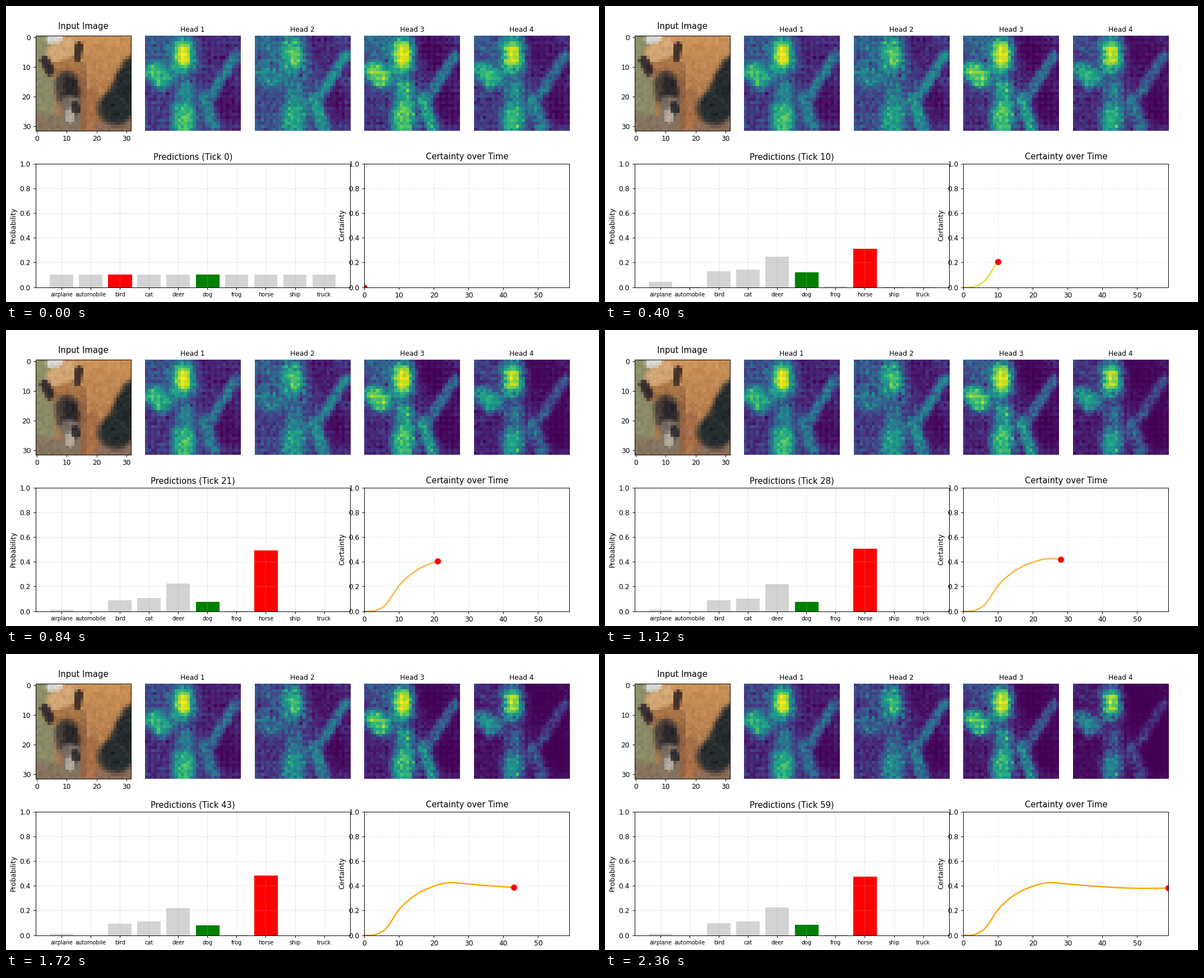
Write a matplotlib script that moves like this. It is 1058 px wide and 529 px high and loops after 2400 ms.

```python
import numpy as np
import matplotlib.pyplot as plt
from matplotlib.animation import FuncAnimation
from matplotlib.colors import to_rgb

plt.rcParams["font.family"] = "DejaVu Sans"
TICKS, N = 60, 32
CLASSES = ["airplane", "automobile", "bird", "cat", "deer",
           "dog", "frog", "horse", "ship", "truck"]
BIRD, DEER, DOG = (CLASSES.index(c) for c in ("bird", "deer", "dog"))

rng = np.random.default_rng(7)
row, col = np.mgrid[0:N, 0:N]


def paint(img, strokes, sharp):
    """Blend (value, x0, y0, x1, y1, width) strokes over img, in order."""
    for value, x0, y0, x1, y1, w in strokes:
        dx, dy = x1 - x0, y1 - y0
        u = np.clip(((col - x0) * dx + (row - y0) * dy) / (dx * dx + dy * dy), 0, 1)
        d = np.hypot(col - x0 - u * dx, row - y0 - u * dy)
        mask = np.exp(-(d / (w + .4)) ** sharp)[..., None]
        img = img + (np.asarray(value) - img) * mask
    return img


# ---- input picture: soft flat shapes -------------------------------------
SHAPES = [
    ("#8e8f67", 1, 0, 0, 12, 4.5), ("#8b8a66", 2, 16, 2, 24, 4.5),
    ("#857560", 1, 29, 13, 30.5, 3), ("#a87048", 18, 19, 18, 32, 2),
    ("#966442", 15.3, 10, 15.3, 30, .8), ("#d7d7d4", 5, .8, 7, .5, 1.6),
    ("#aa7648", 6, 10, 12, 11, 3.5), ("#d4a876", 6, 5.5, 11, 3.5, 2.8),
    ("#3a2d30", 2.5, 8, 4.3, 11.5, 1.3), ("#423028", 14, 3, 13.5, 7, 1),
    ("#423a37", 10, 15.5, 10.5, 19.5, 3.8), ("#2a2628", 11, 16, 11.5, 18, 2),
    ("#7a7066", 11, 23, 11.5, 26, 2.9), ("#b4aa9e", 11, 25.5, 11, 27.5, 1.1),
    ("#323030", 12.8, 23, 13, 24.5, 1.1), ("#8c6c58", 22, 31, 32, 29.5, 2.5),
    ("#262d2f", 32.5, 11, 27, 22, 4.4), ("#262d2f", 25.3, 24, 26.2, 24.5, 5),
    ("#262d2f", 30, 14, 29, 24, 3),
]


def make_photo():
    fade = (row / (N - 1))[..., None]
    base = (1 - fade) * to_rgb("#cb9258") + fade * to_rgb("#a87248")
    img = paint(base, [(to_rgb(c), *s) for c, *s in SHAPES], 7)
    return np.clip(img + rng.normal(0, .018, (N, N, 1)), 0, 1)


# ---- attention maps: one skeleton, other levels per head -----------------
PARTS = [
    (0, 1, 8, 5, 5), (20, 3, 27, 9, 7), (26, 20, 28, 25, 5),          # backdrop
    (6, 13, 11, 11, 3), (13, 17, 13, 24, 2.8),                        # links
    (29.7, 6.5, 21.5, 19.5, 1.5), (19, 21, 22.2, 30, 1.8),            # bands
    (2.5, 11.5, 5, 14, 3), (12.5, 26, 12.6, 29.5, 3.6),               # blobs
    (12.4, 3.5, 12.5, 8.5, 3.7), (12.3, 4.8, 12.5, 7.5, 2),
]
# base level, contrast growth, level of each part
HEADS = [
    (.18, .25, [.30, .12, .05, .40, .45, .42, .45, .68, .70, .66, .97]),
    (.24, .45, [.36, .11, .06, .36, .44, .48, .52, .46, .62, .58, .75]),
    (.16, .45, [.34, .03, .03, .45, .64, .38, .56, .80, .75, .74, .95]),
    (.16, .95, [.27, .05, .03, .40, .47, .36, .42, .67, .66, .68, .92]),
]


def make_map(base, levels):
    strokes = [(v, *p) for v, p in zip(levels, PARTS)]
    z = paint(np.full((N, N, 1), base), strokes, 3)[..., 0]
    weave = .016 * ((-1.0) ** row + (-1.0) ** col)
    grain = rng.normal(0, 1, (N, N)) * (.01 + .24 * z * (1 - z))
    return np.clip(z + weave + grain, .004, 1)


MAPS = [make_map(base, levels) for base, _, levels in HEADS]


def attention(i, t):
    return MAPS[i] ** (1 + HEADS[i][1] * t / (TICKS - 1))


# ---- certainty and predictions -------------------------------------------
KEYS = np.array([(0, 0), (3, .004), (6, .048), (10, .208), (14, .311), (20, .396),
                 (25, .426), (28, .419), (36, .4), (51, .379), (59, .381)])


def hermite(t, ts, ys):
    m = np.gradient(ys, ts)
    i = np.clip(np.searchsorted(ts, t, side="right") - 1, 0, len(ts) - 2)
    h = ts[i + 1] - ts[i]
    u = (t - ts[i]) / h
    return ((1 + 2 * u) * (1 - u) ** 2 * ys[i] + u * (1 - u) ** 2 * h * m[i]
            + u * u * (3 - 2 * u) * ys[i + 1] + u * u * (u - 1) * h * m[i + 1])


certainty = np.clip(hermite(np.arange(TICKS), *KEYS.T), 0, 1)
LOGITS = np.array([-3.6, -12.3, -1.6, -1.45, -.76, -1.76, -7.2, 0, -11, -8.6])


def predict(t):
    """Softmax that sharpens with certainty; bird leads first, deer fades late."""
    z = LOGITS * certainty[t] / certainty[-1]
    z[BIRD] += .02 * np.exp(-t)
    z[DEER] += .25 * np.exp(-((t - 13) / 5) ** 2)
    p = np.exp(z)
    return p / p.sum()


def line_color(t):
    return "#dcdc32" if t < 20 else "#ffb43c" if t < 32 else "orange"


# ---- layout --------------------------------------------------------------
fig = plt.figure(figsize=(12, 6), dpi=529 / 6, facecolor="white")
grid = fig.add_gridspec(2, 5, height_ratios=[1, 1.3], wspace=.15, hspace=.3,
                        left=.0498, right=.95, bottom=.05, top=.9)
cells = dict(interpolation="nearest", aspect="auto")

ax_img = fig.add_subplot(grid[0, 0])
ax_img.imshow(make_photo(), **cells)
ax_img.set_xticks(range(0, N, 10))
ax_img.set_yticks(range(0, N, 10))
ax_img.set_title("Input Image", pad=10)

maps = []
for i in range(len(HEADS)):
    ax = fig.add_subplot(grid[0, i + 1])
    maps.append(ax.imshow(attention(i, 0), cmap="viridis", vmin=0, vmax=1, **cells))
    ax.set_title(f"Head {i + 1}", fontsize=10)
    ax.axis("off")

ax_bar = fig.add_subplot(grid[1, :3])
bars = ax_bar.bar(CLASSES, predict(0))
ax_bar.set_ylim(0, 1)
ax_bar.tick_params(axis="x", labelsize=8)
ax_bar.set_ylabel("Probability")
ax_bar.grid(True, alpha=.3)
title = ax_bar.set_title("")

ax_cert = fig.add_subplot(grid[1, 3:])
ax_cert.set_xlim(0, TICKS - 1)
ax_cert.set_ylim(0, 1)
ax_cert.set_title("Certainty over Time")
ax_cert.set_xlabel("Tick")
ax_cert.set_ylabel("Certainty")
ax_cert.grid(True, linestyle="--", alpha=.3)
curve, = ax_cert.plot([], [], lw=2)
dot, = ax_cert.plot([], [], "ro", ms=8)


def draw(t):
    for i, im in enumerate(maps):
        im.set_data(attention(i, t))
    probs = predict(t)
    for i, (bar, p) in enumerate(zip(bars, probs)):
        bar.set_height(p)
        if i == DOG or p == probs.max():
            bar.set(color="green" if i == DOG else "red", linewidth=1)
        else:
            bar.set(facecolor="lightgray", edgecolor="none")
    title.set_text(f"Predictions (Tick {t})")
    curve.set_data(np.arange(t + 1), certainty[:t + 1])
    curve.set_color(line_color(t))
    dot.set_data([t], [certainty[t]])
    return [*maps, *bars, title, curve, dot]


anim = FuncAnimation(fig, draw, frames=TICKS, interval=40, repeat=True, blit=False)
plt.show()
```
